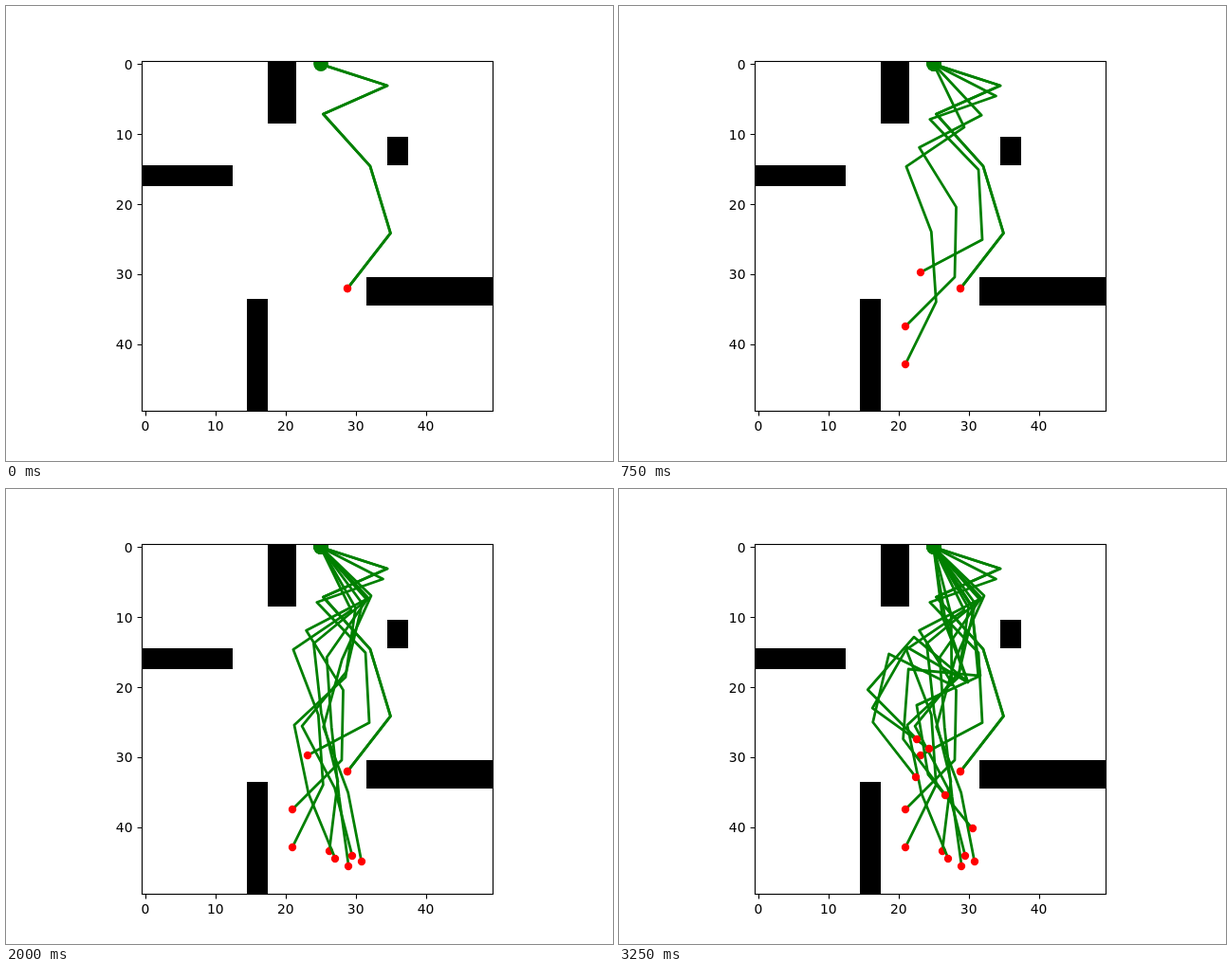
Animation, 640 px wide and 480 px high, one loop 3500 ms. Source, as an HTML page with a canvas:

```html
<!DOCTYPE html>
<html>
<head>
<meta charset="utf-8">
<style>
html, body { margin: 0; width: 100%; height: 100%; overflow: hidden; background: #fff; }
canvas { display: block; }
</style>
</head>
<body>
<canvas id="stage" width="640" height="480"></canvas>
<script>
const ctx = document.getElementById("stage").getContext("2d");
const UNIT = 7.392, LINK = 10 * UNIT, STEP = 250;
const px = d => 143.2 + (d + 0.5) * UNIT;
const py = d => 57.6 + (d + 0.5) * UNIT;

// Grid cells: column, row, width, height
const obstacles = [
  [18, 0, 4, 9], [35, 11, 3, 4], [0, 15, 13, 3], [32, 31, 18, 4], [15, 34, 3, 16]
];

// Heading of each link in degrees, clockwise from the x axis
const arms = [
  [17.9, 156.1, 48, 73.1, 127.9],
  [27.1, 160.6, 46.1, 86.9, 152.2],
  [46.9, 152.6, 58.2, 91.2, 135],
  [64.1, 145.8, 69, 86.1, 116.2],
  [47.7, 140.5, 83.8, 76.3, 97],
  [48.7, 124.9, 86.1, 83.8, 82.2],
  [43.9, 114.5, 105.4, 69.4, 79],
  [53.6, 103.1, 129.2, 62.2, 75.5],
  [60.1, 98.2, 137, 78.3, 67.6],
  [57.6, 82.5, 155.1, 80.7, 50.8],
  [56.9, 84.8, 185.3, 94.3, 53],
  [75.5, 89.5, 206.3, 103.2, 52],
  [80.8, 70.7, 210, 119.8, 35.7],
  [82.8, 68.8, 219.9, 131.2, 45.2]
];

function dot(x, y, r, color) {
  ctx.fillStyle = color;
  ctx.beginPath();
  ctx.arc(Math.round(x), Math.round(y), r, 0, 2 * Math.PI);
  ctx.fill();
}

function drawArm(headings) {
  let x = px(25), y = py(0);
  dot(x, y, 7.64, "#008000");
  ctx.strokeStyle = "#008000";
  ctx.lineWidth = 2.78;
  ctx.lineJoin = "round";
  ctx.lineCap = "square";
  ctx.beginPath();
  ctx.moveTo(x, y);
  for (const deg of headings) {
    const a = deg * Math.PI / 180;
    x += LINK * Math.cos(a);
    y += LINK * Math.sin(a);
    ctx.lineTo(x, y);
  }
  ctx.stroke();
  dot(x, y, 4.17, "#ff0000");
}

function drawAxes() {
  ctx.strokeStyle = ctx.fillStyle = "#000";
  ctx.lineWidth = 1.11;
  ctx.lineJoin = "miter";
  ctx.lineCap = "butt";
  ctx.strokeRect(143.5, 58.5, 370, 369);
  ctx.font = '13.89px "DejaVu Sans", sans-serif';
  ctx.beginPath();
  for (let v = 0; v <= 40; v += 10) {
    const x = Math.round(px(v)) + 0.5, y = Math.round(py(v)) + 0.5;
    ctx.moveTo(x, 427.5);
    ctx.lineTo(x, 432.4);
    ctx.moveTo(143.5, y);
    ctx.lineTo(138.6, y);
    ctx.textAlign = "center";
    ctx.fillText(v, px(v), 448);
    ctx.textAlign = "right";
    ctx.fillText(v, 133.5, Math.round(py(v) + 5.4));
  }
  ctx.stroke();
}

function drawScene(count) {
  ctx.fillStyle = "#fff";
  ctx.fillRect(0, 0, 640, 480);
  ctx.save();
  ctx.beginPath();
  ctx.rect(143, 58, 370, 369);
  ctx.clip();
  ctx.fillStyle = "#000";
  for (const [c, r, w, h] of obstacles) {
    const x = Math.round(143 + c * 7.4), y = Math.round(57 + r * 7.4);
    ctx.fillRect(x, y, Math.round(143 + (c + w) * 7.4) - x, Math.round(57 + (r + h) * 7.4) - y);
  }
  drawArm(arms[0]); // the starting pose is drawn twice, so its edges are heavier
  arms.slice(0, count).forEach(drawArm);
  ctx.restore();
  drawAxes();
}

const start = performance.now();
function tick() {
  const t = Math.max(0, performance.now() - start);
  drawScene(Math.floor(t / STEP) % arms.length + 1);
  requestAnimationFrame(tick);
}
tick();
</script>
</body>
</html>
```
